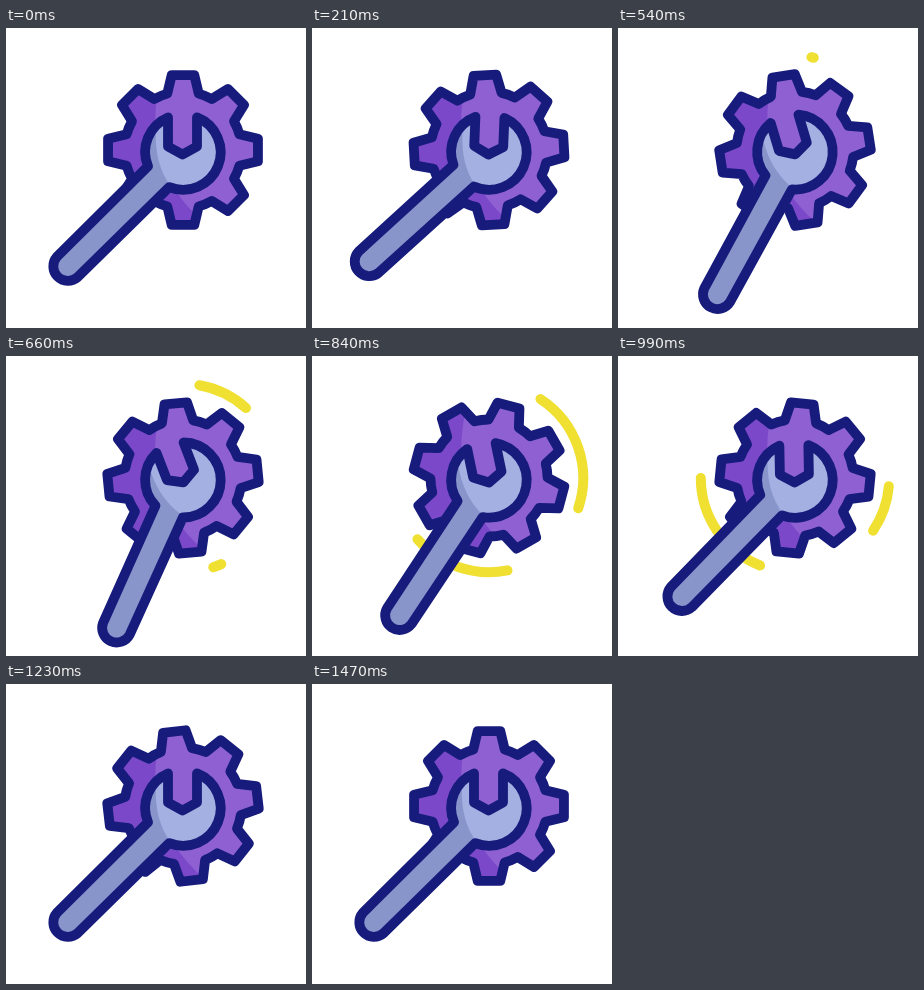
Animation of 300 by 300 pixels, one loop 2.25 s. Source, as an HTML page:

```html
<!DOCTYPE html>
<html lang="en">
<head>
<meta charset="utf-8">
<title>Gear and wrench</title>
<style>
  html, body { margin: 0; width: 100%; height: 100%; overflow: hidden; background: #fff; }
  svg { display: block; width: 100%; height: 100%; }
  .line { fill: none; stroke: #161b7c; stroke-width: 9.8; stroke-linejoin: round; stroke-linecap: round; }
  .arc { fill: none; stroke: #efe032; stroke-width: 10; stroke-linecap: round; }
</style>
</head>
<body>
<svg viewBox="0 0 300 300">
  <defs>
    <path id="gearShape"/>
    <path id="wrenchShape"/>
    <clipPath id="gearClip"><use id="gearMask" href="#gearShape"/></clipPath>
    <clipPath id="wrenchClip"><use href="#wrenchShape"/></clipPath>
  </defs>
  <path class="arc" id="upper"/>
  <path class="arc" id="lower"/>
  <g clip-path="url(#gearClip)">
    <path fill="#7a48c8" d="M80 20H280V220H80Z"/>
    <path fill="#8f60d2" d="M160 30C140 95 144 150 204 200H280V30Z"/>
  </g>
  <use class="line" id="gearLine" href="#gearShape"/>
  <g id="wrench">
    <g clip-path="url(#wrenchClip)">
      <path fill="#8795cb" d="M30 70H230V270H30Z"/>
      <path fill="#a4b0e1" d="M153 80C146 115 150 143 171 166H230V80Z"/>
    </g>
    <use class="line" href="#wrenchShape"/>
  </g>
</svg>
<script>
const LOOP = 2250, STEP = 30, CX = 177, CY = 122, HX = 176.5, HY = 124;
const $ = id => document.getElementById(id);
const rad = deg => deg * Math.PI / 180;
const polar = (r, deg) => [CX + r * Math.cos(rad(deg)), CY + r * Math.sin(rad(deg))];
const pt = p => p.map(v => v.toFixed(2)).join(' ');

function gearPath() {
  const top = 75.8, root = 58.5, topA = 8.6, rootA = 15.6;
  const valley = `A${root} ${root} 0 0 1 `;
  let d = '';
  for (let a = 0; a < 360; a += 45) {
    d += (a ? valley : 'M') + pt(polar(root, a - rootA)) +
      `L${pt(polar(top, a - topA))}L${pt(polar(top, a + topA))}L${pt(polar(root, a + rootA))}`;
  }
  return d + valley + pt(polar(root, -rootA)) + 'Z';
}

function wrenchPath() {
  return `M162 89.4V118.5L176.5 126.5L191 118.5V89.4
    A37.5 37.5 0 0 1 163.3 159.1
    L71.5 249.3A14.6 14.6 0 0 1 50.9 228.7L142 138.2
    A37.5 37.5 0 0 1 162 89.4Z`;
}

// Cubic bezier easing, solved by bisection
function bezier(x1, y1, x2, y2) {
  const at = (a, b, s) => 3 * a * s * (1 - s) ** 2 + 3 * b * s * s * (1 - s) + s ** 3;
  return p => {
    let lo = 0, hi = 1;
    for (let i = 0; i < 24; i++) {
      const mid = (lo + hi) / 2;
      if (at(x1, x2, mid) < p) lo = mid; else hi = mid;
    }
    return at(y1, y2, (lo + hi) / 2);
  };
}

const smooth = p => p * p * (3 - 2 * p);
const spin = bezier(.52, 0, .35, 1);
const trail = p => p ** 1.4;
const ramp = (t, from, to, ease = smooth) =>
  ease(Math.min(1, Math.max(0, (t - from) / (to - from))));

const wrenchAngle = t =>
  3.1 * ramp(t, 0, 310) - 24.2 * ramp(t, 310, 626) + 21.1 * ramp(t, 670, 1040);
const gearAngle = t => -8.8 * ramp(t, 0, 520) + 98.8 * ramp(t, 520, 1470, spin);

function drawArc(el, start, sweep, head, tail) {
  const r = 94.2;
  const a = polar(r, start + sweep * tail), b = polar(r, start + sweep * head);
  el.setAttribute('d', head - tail > .004 ? `M${pt(a)}A${r} ${r} 0 0 1 ${pt(b)}` : '');
}

function draw(t) {
  const turn = `rotate(${gearAngle(t)} ${CX} ${CY})`;
  $('gearMask').setAttribute('transform', turn);
  $('gearLine').setAttribute('transform', turn);
  $('wrench').setAttribute('transform', `rotate(${wrenchAngle(t)} ${HX} ${HY})`);
  drawArc($('upper'), -80, 114, ramp(t, 511, 938), ramp(t, 726, 1120));
  drawArc($('lower'), 66, 114, ramp(t, 610, 995), ramp(t, 740, 1220, trail));
}

$('gearShape').setAttribute('d', gearPath());
$('wrenchShape').setAttribute('d', wrenchPath());

const begin = performance.now();
function tick() {
  const t = (performance.now() - begin) % LOOP;
  draw(Math.floor(t / STEP) * STEP);
  requestAnimationFrame(tick);
}
tick();
</script>
</body>
</html>
```
